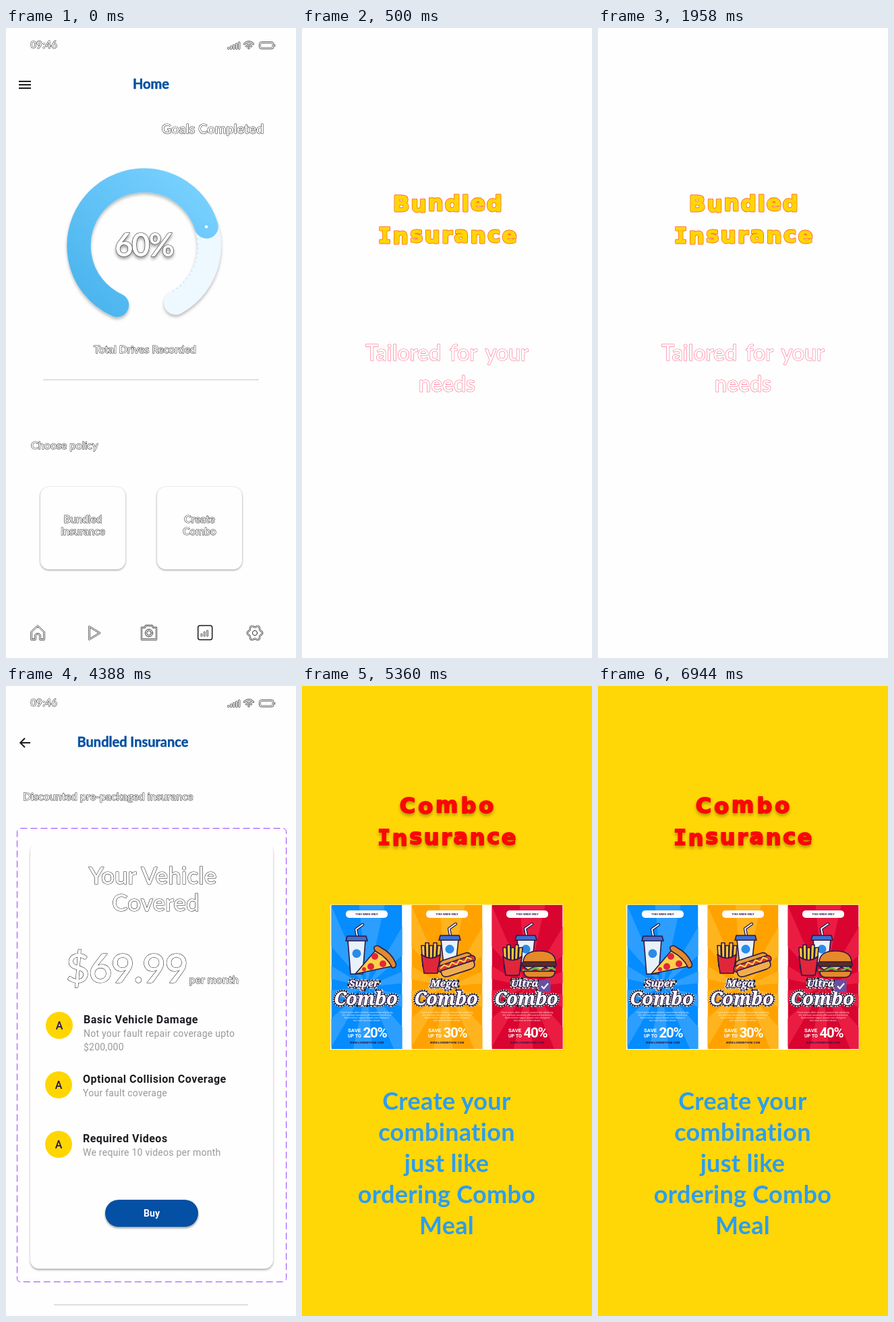
These frames come from a looping animation (430x932 px, 8 s). An HTML page:

```html
<!DOCTYPE html>
<html lang="en">
<head>
<meta charset="utf-8">
<title>Insurance app</title>
<style>
  html, body { margin: 0; width: 100%; height: 100%; overflow: hidden; background: #fefefe; }
  svg { display: block; width: 430px; height: 932px; }
  text { font-family: Lato, sans-serif; white-space: pre; }
  .hollow { fill: #fefefe; stroke: #1c1c1c; stroke-width: 1; paint-order: stroke; stroke-linejoin: round; }
  .pink { stroke: #ff4f78; }
  .title { fill: #0450a0; stroke: #0450a0; stroke-width: .5; font-weight: 700; }
  .roboto { font-family: Roboto, sans-serif; }
  .fun { font-family: "DejaVu Sans", sans-serif; font-weight: 700; stroke-linejoin: round; }
  .slab { font-family: "DejaVu Sans Mono", monospace; }
  .script { font-family: "Noto Serif", serif; font-weight: 700; font-style: italic; stroke-linejoin: round; }
  .line { fill: none; stroke-linecap: round; stroke-linejoin: round; }
  .food { stroke: #2a1a4a; stroke-width: 1.6; stroke-linejoin: round; stroke-linecap: round; }
  .card { fill: #fefefe; filter: drop-shadow(0 1px 1.5px rgba(0,0,0,.42)); }
</style>
</head>
<body>
<svg id="stage" viewBox="0 0 430 932" xmlns="http://www.w3.org/2000/svg"></svg>
<script>
const LOOP = 8000;
const STARTS = [0, 500, 2930, 5360];
const DARK = '#1c1c1c', PAPER = '#fefefe', GOLD = '#ffd606';

const text = (x, y, size, str, attrs = '') =>
  `<text x="${x}" y="${y}" font-size="${size}" ${attrs}>${str}</text>`;
const mid = (x, y, size, str, attrs = '') => text(x, y, size, str, `text-anchor="middle" ${attrs}`);
const rect = (x, y, w, h, r, attrs) =>
  `<rect x="${x}" y="${y}" width="${w}" height="${h}" rx="${r}" ${attrs}/>`;
const circle = (x, y, r, attrs) => `<circle cx="${x}" cy="${y}" r="${r}" ${attrs}/>`;
const path = (d, attrs) => `<path d="${d}" ${attrs}/>`;
const polar = (x, y, r, a) => `${(x + r * Math.cos(a)).toFixed(2)} ${(y + r * Math.sin(a)).toFixed(2)}`;
const hollow = 'class="hollow" font-weight="600"';

// A stroke shown only by its two edges
const tube = (d, w = 2.8) =>
  path(d, `class="line" stroke="${DARK}" stroke-width="${w}"`) +
  path(d, `class="line" stroke="${PAPER}" stroke-width="${w - 1.3}"`);

function statusBar() {
  const bars = [0, 1, 2, 3, 4].map(i =>
    rect(328.5 + i * 4, 28.5 - i * 2, 2.4, 3 + i * 2, .8, `fill="none" stroke="${DARK}" stroke-width=".7"`)).join('');
  return text(36.5, 30, 14.6, '09:46', hollow + ' letter-spacing=".4"') + bars +
    tube('M353.5 23.5Q360 17.5 366.5 23.5') + tube('M356.5 27Q360 23.5 363.5 27') +
    circle(360, 29.6, 1.4, `fill="${PAPER}" stroke="${DARK}" stroke-width=".8"`) +
    rect(375.5, 20.5, 21.5, 10.5, 3, `fill="none" stroke="#555"`) +
    rect(377.5, 22.5, 17.5, 6.5, 1.5, `fill="none" stroke="${DARK}" stroke-width=".6"`) +
    path('M398.8 24v3.5', 'stroke="#555"');
}

function gauge() {
  const at = (deg, r = 96.7) => polar(204.7, 322, r, deg * Math.PI / 180);
  const arc = (deg, stroke) =>
    path(`M${at(114.5)}A96.7 96.7 0 1 1 ${at(deg)}`, `class="line" stroke="${stroke}" stroke-width="35.4"`);
  return `<defs><linearGradient id="sky" gradientUnits="userSpaceOnUse" x1="130" y1="400" x2="285" y2="235">
      <stop stop-color="#4db6ee"/><stop offset="1" stop-color="#78d0ff"/></linearGradient></defs>
    <g style="filter:drop-shadow(0 3px 2px rgba(0,0,0,.26))">` +
    arc(61, '#eef8ff') + arc(-17, 'url(#sky)') + '</g>' +
    path(`M${at(-7, 80)}A80 80 0 0 1 ${at(60, 80)}`, 'class="line" stroke="#8ad7fb" stroke-width="1.3" stroke-dasharray=".1 6.8"') +
    circle(297, 294, 2.2, 'fill="#fff"') +
    mid(204.5, 338, 47, '60%', 'class="hollow" font-weight="700" letter-spacing="-2.2" style="filter:drop-shadow(0 3px 2px rgba(0,0,0,.4))"');
}

function navBar() {
  const thin = `class="line" stroke="${DARK}" stroke-width=".9"`;
  let gear = '';
  for (let i = 0; i < 72; i++) {
    const a = i * Math.PI / 36;
    gear += (i ? 'L' : 'M') + polar(369, 895, 9.9 + 1.3 * Math.cos(6 * a), a);
  }
  const bars = [4, 7, 9].map((h, i) =>
    rect(289 + i * 4.3, 900 - h, 2, h, .5, `fill="none" stroke="${DARK}" stroke-width=".7"`)).join('');
  return tube('M37.5 893.5L47 884.5L56.5 893.5V904.5H50.5V898Q47 894.5 43.5 898V904.5H37.5Z', 2.4) +
    tube('M123.5 885.5V904.5L139 895Z', 2.4) +
    tube('M201 887H205.5L207.5 884H216.5L218.5 887H223V904.5H201Z', 2.4) +
    circle(212, 895, 5.6, thin) + circle(212, 895, 3.4, thin) +
    rect(284.7, 884, 21, 21, 3, `fill="none" stroke="${DARK}" stroke-width="1.5"`) + bars +
    tube(gear + 'Z', 2.4) + circle(369, 895, 3.6, thin);
}

function home() {
  const button = (x, a, b) => rect(x, 679, 126, 122, 13, 'class="card"') +
    mid(x + 63, 732, 15.5, a, hollow) + mid(x + 63, 750, 15.5, b, hollow);
  return statusBar() +
    path('M19 79H37M19 84H37M19 89H37', `stroke="${DARK}" stroke-width="2"`) +
    mid(215, 89.5, 20, 'Home', 'class="title"') +
    mid(306.5, 156, 20, 'Goals Completed', hollow) + gauge() +
    mid(206, 481, 15.7, 'Total Drives Recorded', hollow) +
    path('M55 520.5H375', 'stroke="#c9c3d6"') +
    text(37, 623, 16, 'Choose policy', hollow) +
    button(51, 'Bundled', 'Insurance') + button(224, 'Create', 'Combo') + navBar();
}

const slabI = '<tspan class="slab">I</tspan>nsurance';
const hop = 'dy="0 1 -2 1 0 -1 1 -1 1"';

function bundledAd() {
  const word = (y, str, ls) => {
    const layer = (color, w) => mid(217, y, 32, str,
      `class="fun" ${hop} letter-spacing="${ls}" fill="${color}" stroke="${color}" stroke-width="${w}"`);
    return layer('#ff4a2a', 2.8) + layer(GOLD, 1.5);
  };
  const pink = 'class="hollow pink" font-weight="600"';
  return word(270.5, 'Bundled', 2.2) + word(317.5, slabI, 2.6) +
    mid(215, 492, 32, 'Tailored for your', pink + ' word-spacing="5"') +
    mid(215, 538, 32, 'needs', pink);
}

function policy() {
  const row = (x, y, head, ...lines) =>
    circle(x - 36, y + 3, 20, 'fill="#ffd600"') +
    mid(x - 36, y + 8.5, 16, 'A', 'class="roboto" font-weight="500" fill="#21104d"') +
    text(x, y, 16, head, 'class="roboto" font-weight="600" letter-spacing=".5" fill="#1d1b20"') +
    lines.map((s, i) => text(x, y + 20 + 20 * i, 14, s, 'class="roboto" letter-spacing=".25" fill="#999"')).join('');
  return statusBar() +
    path('M36 84H21.5M28 77.2L21.2 84L28 90.8', `fill="none" stroke="${DARK}" stroke-width="2"`) +
    mid(188, 89.5, 20, 'Bundled Insurance', 'class="title"') +
    text(25, 168.5, 16, 'Discounted pre-packaged insurance', hollow) +
    rect(16.5, 210.5, 399, 671, 5, 'fill="none" stroke="#9747ff" stroke-dasharray="10 5"') +
    rect(36, 232, 360, 630, 13, 'fill="#fefefe" style="filter:drop-shadow(0 2px 1.7px rgba(0,0,0,.32))"') +
    rect(33, 225, 366, 12, 0, `fill="${PAPER}"`) +
    mid(217.5, 293, 35, 'Your Vehicle', hollow) + mid(222, 333, 35, 'Covered', hollow) +
    text(89, 439, 60, '$69.99', hollow + ' letter-spacing="-1.4"') +
    text(271.5, 440, 16, 'per month', hollow) +
    row(115, 499, 'Basic Vehicle Damage', 'Not your fault repair coverage upto', '$200,000') +
    row(114, 587, 'Optional Collision Coverage', 'Your fault coverage') +
    row(114, 675, 'Required Videos', 'We require 10 videos per month') +
    rect(147, 760, 138, 40, 20, 'fill="#0350a4" style="filter:drop-shadow(0 2px 1.5px rgba(0,0,0,.4))"') +
    mid(216, 785, 14, 'Buy', 'class="roboto" font-weight="600" fill="#fff" letter-spacing=".1"') +
    path('M71 915.5H359', 'stroke="#c6c6ca"');
}

// Food drawings for the three posters
const food = (d, fill) => path(d, `class="food" fill="${fill}"`);

const cup = (x, y, h) =>
  path(`M${x + 1} ${y}l-2 -10l10 -7`, 'class="line" stroke="#2a1a4a" stroke-width="4.4"') +
  path(`M${x + 1} ${y}l-2 -10l10 -7`, 'class="line" stroke="#fff" stroke-width="1.8"') +
  food(`M${x - 13} ${y + 6}H${x + 13}L${x + 9} ${y + h}H${x - 9}Z`, '#e9f2fb') +
  circle(x, y + h * .46, 6.5, 'fill="#2b8be8"') +
  food(`M${x - 14} ${y}h28l2 7h-32Z`, '#3f6fd0');

const fries = (x, y) => {
  const sticks = [-12, -7, -2, 3, 8].map((d, i) =>
    food(`M${x + d} ${y + 14}l${-2 + i} ${-31 - i % 2 * 4}h5l${1 - i} 35Z`, '#ffc93c')).join('');
  return sticks + food(`M${x - 14} ${y - 4}Q${x} ${y + 7} ${x + 14} ${y - 4}L${x + 10} ${y + 24}H${x - 10}Z`, '#e2263a');
};

const pizza = () => food('M79 426L110 390L136 414Z', '#ffcf4d') +
  food('M107 386Q112 382 117 387Q133 395 139 410Q141 417 134 417Q127 402 110 393Q106 390 107 386Z', '#e08a2e') +
  [[108, 400, 5], [120, 411, 5], [102, 415, 5], [92, 419, 3]].map(([x, y, r]) => circle(x, y, r, 'fill="#e0283a"')).join('');

const hotDog = () => '<g transform="rotate(-18 229 411)">' +
  rect(204, 400, 50, 14, 7, 'class="food" fill="#e89a3c"') +
  rect(200, 406, 58, 10, 5, 'class="food" fill="#d83a34"') +
  path('M205 410l6 -3l6 5l6 -5l6 5l6 -5l6 5l6 -5l5 4', 'class="line" stroke="#ffd94a" stroke-width="2"') +
  food('M204 414H254Q257 425 245 425H213Q201 425 204 414Z', '#f0ad4e') + '</g>';

const burger = () => food('M328 409Q328 392 352 392Q376 392 376 409Z', '#e58a2b') +
  rect(326, 408, 51, 7, 3.5, 'class="food" fill="#5a2d20"') +
  food('M328 415H376L369 420L361 416L352 421L343 416L335 420Z', '#ffd34a') +
  path('M328 420q6 5 12 0t12 0t12 0t11 0', 'class="line" stroke="#6cb33f" stroke-width="3"') +
  food('M329 422H375Q375 431 366 431H338Q329 431 329 422Z', '#e58a2b');

function poster(x, base, ray, name, percent, art) {
  const w = 105, cx = x + w / 2;
  let rays = '';
  for (let i = 0; i < 10; i++) {
    const a = (i + .35) * Math.PI / 5;
    rays += `M${cx} 445L${polar(cx, 445, 200, a)}L${polar(cx, 445, 200, a + .31)}Z`;
  }
  const logo = (tx, y, size, str) => {
    const layer = (fill, stroke, sw, more = '') =>
      mid(tx, y, size, str, `class="script" fill="${fill}" stroke="${stroke}" stroke-width="${sw}" ${more}`);
    return layer('#111', '#111', 5.6) + layer('none', '#fff', 5.6, 'stroke-dasharray="1.4 1.4"') +
      layer('#2a1a4a', '#2a1a4a', 3) + layer('#fff', '#fff', .5);
  };
  const small = (y, str) => mid(cx, y, 3.3, str, 'class="roboto" fill="#fff" opacity=".85"');
  return `<clipPath id="${name}">${rect(x, 324, w, 213, 0, '')}</clipPath><g clip-path="url(#${name})">` +
    rect(x, 324, w, 213, 0, `fill="${base}"`) + path(rays, `fill="${ray}"`) + '</g>' +
    rect(cx - 31, 332, 62, 11, 5, 'fill="#fff"') +
    mid(cx, 339.2, 4.3, 'THIS WEEK ONLY', 'class="roboto" font-weight="700" fill="#2a1a4a"') + art +
    logo(cx - 4, 445, 15, name) + logo(cx - 1.5, 472, 27, 'Combo') +
    small(484, 'Lorem ipsum dolor sit amet, consectetuer adipiscing') +
    small(488, 'elit, sed diam nonummy nibh euismod tincidunt ut') +
    small(492, 'laoreet dolore magna aliquam erat volutpat ut') + small(496, 'wisi enim ad minim veniam') +
    `<g fill="#fff" font-weight="700">` +
    text(x + 24.5, 511.5, 7.8, 'SAVE', 'class="roboto"') + text(x + 24.5, 520, 7, 'UP TO', 'class="roboto"') +
    text(x + 47, 520, 20.5, percent + '%', 'class="roboto" letter-spacing="-1.2"') + '</g>' +
    mid(cx, 528.5, 4.3, 'WWW.LOREMIPSUM.COM', 'class="roboto" font-weight="700" fill="#2a1a4a"');
}

function comboAd() {
  const head = `class="fun" ${hop} fill="#fe0605" stroke="#fe0605" stroke-width="1.8" style="filter:drop-shadow(0 3px 2px rgba(0,0,0,.3))"`;
  const lines = ['Create your', 'combination', 'just like', 'ordering Combo', 'Meal'];
  return rect(0, 0, 430, 932, 0, `fill="${GOLD}"`) +
    mid(216.5, 187.5, 32, 'Combo', head + ' letter-spacing="4"') +
    mid(216, 234.5, 32, slabI, head + ' letter-spacing="2.6"') +
    rect(42, 323.5, 345, 214.5, 0, 'fill="#fff"') +
    poster(43.5, '#058cff', '#2b9eff', 'Super', 20, cup(81, 370, 56) + pizza()) +
    poster(162.5, '#ffa200', '#ffb31f', 'Mega', 30, cup(219, 369, 44) + fries(191, 401) + hotDog()) +
    poster(281.5, '#d9042f', '#ea1c41', 'Ultra', 40, cup(332, 369, 44) + fries(312, 404) + burger()) +
    rect(351, 435, 17.5, 17.5, 1, 'fill="#6750a4"') +
    path('M355 444l3.5 3.5l6.5 -7.5', 'fill="none" stroke="#fff" stroke-width="2"') +
    lines.map((s, i) => mid(214.5, 627 + 46 * i, 36, s, 'fill="#2b9df0" font-weight="700" letter-spacing=".3"')).join('');
}

const stage = document.getElementById('stage');
stage.innerHTML = [home, bundledAd, policy, comboAd].map(draw => `<g>${draw()}</g>`).join('');
const scenes = [...stage.children];

function show() {
  const t = performance.now() % LOOP;
  const now = STARTS.filter(s => s <= t).length - 1;
  scenes.forEach((g, i) => { g.style.display = i === now ? '' : 'none'; });
  requestAnimationFrame(show);
}
show();
</script>
</body>
</html>
```
